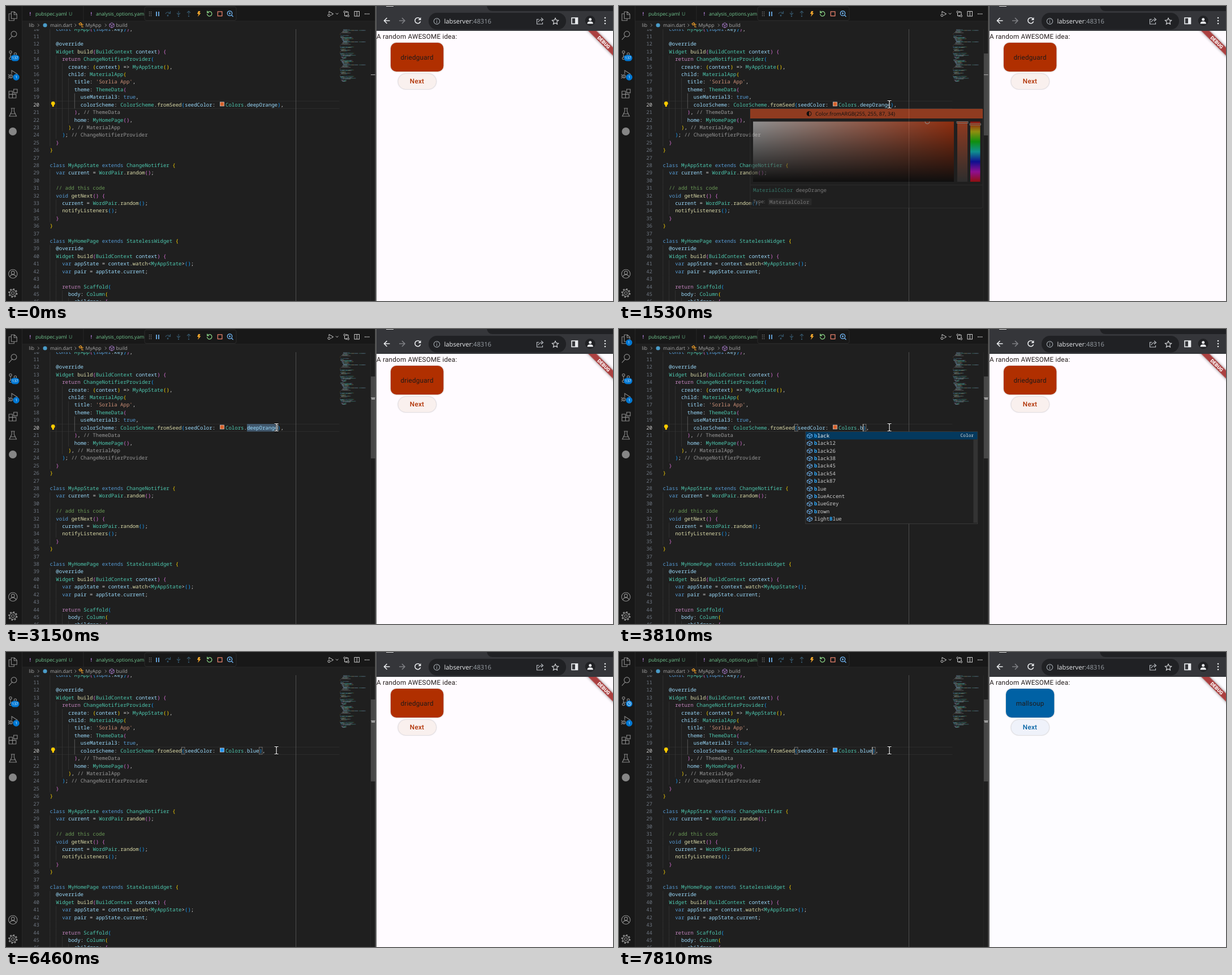
Write an HTML page that moves like this. It is 1073x522 px and loops after 8 s.

```html
<!DOCTYPE html>
<html lang="en">
<head>
<meta charset="utf-8">
<title>Changing a theme colour</title>
<style>
  html, body { margin: 0; width: 100%; height: 100%; overflow: hidden; background: #1f1f1f; }
  svg { display: block; width: 100vw; height: 100vh; text-rendering: geometricPrecision; white-space: pre; }
  .mono { font-family: "Noto Sans Mono", "DejaVu Sans Mono", monospace; font-size: 9.03px; }
  .ui { font-family: "Open Sans", "Noto Sans", sans-serif; font-size: 8.6px; }
  .page { font-family: Roboto, "Liberation Sans", sans-serif; font-size: 11.74px; letter-spacing: .21px; }
  .mid { text-anchor: middle; }
  .end { text-anchor: end; }
</style>
</head>
<body>
<svg id="stage" viewBox="0 0 1073 522" preserveAspectRatio="none"></svg>
<script>
const CODE = `  const MyApp({super.key});

  @override
  Widget build(BuildContext context) {
    return ChangeNotifierProvider(
      create: (context) => MyAppState(),
      child: MaterialApp(
        title: 'Sorlia App',
        theme: ThemeData(
          useMaterial3: true,
          colorScheme: ColorScheme.fromSeed(seedColor:   Colors.deepOrange),
        ), // ThemeData
        home: MyHomePage(),
      ), // MaterialApp
    ); // ChangeNotifierProvider
  }
}

class MyAppState extends ChangeNotifier {
  var current = WordPair.random();

  // add this code
  void getNext() {
    current = WordPair.random();
    notifyListeners();
  }
}

class MyHomePage extends StatelessWidget {
  @override
  Widget build(BuildContext context) {
    var appState = context.watch<MyAppState>();
    var pair = appState.current;

    return Scaffold(
      body: Column(
        children: [`.split('\n');

const FIRST = 10, LEFT = 77.5, CW = 5.42, LH = 13.41, VALUE_X = 388;
const top_ = n => 168 + (n - 20) * LH;
const base = n => top_(n) + 9.7;

// Markup helpers
const esc = s => s.replace(/&/g, '&amp;').replace(/</g, '&lt;');
const rect = (x, y, w, h, fill, more = '') =>
  `<rect x="${x}" y="${y}" width="${w}" height="${h}" fill="${fill}" ${more}/>`;
const box = (x, y, w, h, stroke, more = '') => rect(x, y, w, h, 'none', `stroke="${stroke}" ${more}`);
const circle = (x, y, r, fill, more = '') => `<circle cx="${x}" cy="${y}" r="${r}" fill="${fill}" ${more}/>`;
const line = (d, stroke, w = 1, more = '') => `<path d="${d}" fill="none" stroke="${stroke}" stroke-width="${w}" ${more}/>`;
const shape = (d, fill) => `<path d="${d}" fill="${fill}"/>`;
const text = (x, y, s, fill, cls = 'ui', more = '') =>
  `<text x="${x}" y="${y}" fill="${fill}" class="${cls}" ${more}>${s}</text>`;
const span = (s, fill, more = '') => `<tspan fill="${fill}" ${more}>${s}</tspan>`;
const group = (id, body, more = '') => `<g id="${id}" ${more}>${body}</g>`;

// Syntax colouring
const BRACKETS = ['#ffd700', '#da70d6', '#179fff'];
let depth = 1;
function tint(s, col, src) {
  const next = src[col + s.length];
  if (s.startsWith('//')) return src.trim() === s ? '#6a9955' : '#999';
  if (s[0] === "'") return '#ce9178';
  if ('([{'.includes(s)) return BRACKETS[depth++ % 3];
  if (')]}'.includes(s)) return BRACKETS[--depth % 3];
  if (s === 'return') return '#c586c0';
  if (/^(class|extends|var|void|const|super|true)$/.test(s)) return '#569cd6';
  if (/^[A-Z]/.test(s)) return '#4ec9b0';
  if (/^\w/.test(s) && (next === '(' || next === '<')) return '#dcdcaa';
  return /^[@\w]/.test(s) ? '#9cdcfe' : '#d4d4d4';
}
const tokens = CODE.map(src =>
  [...src.matchAll(/\/\/.*|'.*?'|@?\w+|[^\s\w]/g)].map(m => ({ s: m[0], col: m.index, fill: tint(m[0], m.index, src) })));

function codeLines() {
  return CODE.map((src, i) => {
    const n = FIRST + i;
    const nearest = CODE.slice(i).find(s => s) || '';
    const indent = nearest.search(/\S/);
    let out = '';
    for (let c = 0; c < indent; c += 2) {
      const active = c === 8 && (n === 19 || n === 20);
      out += rect(LEFT + c * CW, top_(n), .7, LH, active ? '#707070' : '#383838');
    }
    const shown = tokens[i].filter(k => n !== 20 || k.col < 55);
    const spans = shown.map(k => span(esc(k.s), k.fill, `x="${LEFT + k.col * CW}"`)).join('');
    return out + text(59, base(n), n, n === 20 ? '#ccc' : '#6e7681', 'mono end') + text(0, base(n), spans, '#ccc', 'mono');
  }).join('');
}

function minimap() {
  let out = '';
  for (let n = 1; n <= 82; n++) {
    const i = (n < FIRST ? n + 18 : n > 46 ? n - 36 : n) - FIRST;
    for (const k of tokens[i])
      out += rect(590 + k.col * .6, 41.6 + (n - 1) * 1.13, k.s.length * .6, .8, k.fill);
  }
  return `<g opacity=".5">${out}</g>`;
}

function activityBar() {
  const icon = (y, body) =>
    `<g transform="translate(3.8 ${y - 8.4}) scale(.7)" fill="none" stroke="#8a8a8a" stroke-width="1.6">${body}</g>`;
  const p = d => `<path d="${d}"/>`;
  const c = (x, y, r, more) => circle(x, y, r, 'none', more);
  const badge = (x, y) => circle(x, y, 5.7, '#0078d4');
  const one = (x, y) => badge(x, y) + text(x, y + 2.4, 1, '#fff', 'ui mid', 'style="font-size:6.5px"');
  return rect(0, 0, 28, 522, '#181818') + rect(28, 0, .8, 522, '#2b2b2b')
    + icon(18, p('M8 1h8l6 6v11H8zM15 1v7h7M8 6H2v17h13v-5'))
    + icon(52, c(14.5, 8.5, 7) + p('M10 14l-8 9'))
    + icon(87, c(6, 4, 3) + c(18, 9, 3) + c(6, 20, 3) + p('M6 7v10M18 12c0 5-12 1-12 5'))
    + icon(121, p('M9 11V2l14 9-10 7') + c(7, 17, 4) + p('M7 13v8M0 12l4 3M0 22l4-3M0 17h3'))
    + icon(155, p('M2 6h9v8h9v9H2zM2 14h9v9M14 1h9v9h-9z'))
    + icon(188, p('M7 2h10M9 2v8L3 22h18L15 10V2M6.500 16h11'))
    + circle(12, 222, 7, '#868686')
    + icon(474, c(12, 12, 11) + c(12, 9, 4) + p('M4 20c2-8 14-8 16 0'))
    + icon(508, c(12, 12, 3.5) + c(12, 12, 8) + c(12, 12, 10, 'stroke-width="3.500" stroke-dasharray="4 3.854"'))
    + group('count', rect(8.500, 86.500, 15, 11, '#0078d4', 'rx="5.500"') + text(16, 94.400, 137, '#fff', 'ui mid', 'style="font-size:6.500px"'))
    + group('clock', badge(18, 91.5) + circle(18, 91.5, 3.3, 'none', 'stroke="#fff" stroke-width=".8"') + line('M18 89.500v2.200h1.800', '#fff', .8))
    + one(18, 126) + group('dirty', one(17.7, 24));
}

function editorHeader() {
  const grey = '#ccc', dim = '#35566b', blue = '#75beff';
  const crumb = (x, s) => text(x, 37.3, s, '#a9a9a9');
  const arrow = x => line(`M${x - 1} 31.500l2.500 2.500-2.500 2.500`, '#a9a9a9', .8);
  return rect(28.8, 0, 624, 41, '#1f1f1f') + rect(28.8, 0, 624, 27, '#181818') + rect(28.8, 26.5, 624, .7, '#2b2b2b')
    + rect(136.5, 0, .8, 27, '#2b2b2b')
    + text(41.5, 17.3, '!', '#b180d7', 'ui', 'font-weight="700"') + text(149.5, 17.3, '!', '#b180d7', 'ui', 'font-weight="700"')
    + text(52, 17.2, 'pubspec.yaml', '#73c991') + text(111, 17.2, 'U', '#5da37a') + text(159, 17.2, 'analysis_options.yaml', '#73c991')
    + rect(245, 1.5, 162, 24, '#181818', 'rx="3" stroke="#303030" stroke-width=".8"')
    + line('M253.500 10v8M256.500 10v8', '#999', 1.2, 'stroke-dasharray="1.200 2.100"')
    + line('M266 10v8M270 10v8', blue, 1.6)
    + line('M282 14a4.500 4.500 0 0 1 8-1M290.500 9v4.300h-4M305 9v6M302 12.500l3 3 3-3M323 15.500v-6M320 12l3-3 3 3', dim, 1.1)
    + circle(286, 17, 1.4, dim) + circle(305, 18, 1.2, dim) + circle(323, 18, 1.2, dim)
    + shape('M340 9h3.500l-1.500 3.500h2.500l-5.500 6.500 1.500-5h-2.500z', '#f0a52d')
    + line('M356.500 11a4.200 4.200 0 1 1-1 3M355.700 8.500v3.300h3.300', '#89d185', 1.3)
    + box(374.3, 10, 7.6, 7.6, '#f48771', 'stroke-width="1.200"')
    + circle(395.5, 13, 4.2, 'none', `stroke="${blue}" stroke-width="1.200"`) + line('M398.500 16l3 3M393.700 13h3.600M395.500 11.200v3.600', blue, 1.2)
    + line('M571 13V9.500l7.500 4.500-4 2.500M583 12.500l2.200 2.200 2.200-2.200', grey) + circle(571, 16.5, 2, 'none', `stroke="${grey}"`)
    + circle(598.5, 10.5, 1.6, 'none', `stroke="${grey}"`) + circle(605, 17.5, 1.6, 'none', `stroke="${grey}"`)
    + line('M598.500 12v5.500h3.500M605 16v-5.500h-3.500M601 15.800l1.500 1.700-1.500 1.700M602.500 8.800l-1.500 1.700 1.500 1.700', grey)
    + box(616, 9.5, 8.5, 8.5, grey) + line('M620.300 9.500v8.500', grey)
    + circle(635, 14, .9, grey) + circle(638.2, 14, .9, grey) + circle(641.4, 14, .9, grey)
    + crumb(40.5, 'lib') + arrow(57) + circle(69, 34, 3.6, '#4a9cc9') + crumb(78, 'main.dart') + arrow(122.5)
    + line('M129 31.500l3-2 2 2-3 2.500zM132 33h5M134 33v4h3', '#ee9d28', 1.1) + crumb(140.5, 'MyApp') + arrow(176)
    + line('M183 32l4-2.300 4 2.300v4.300l-4 2.300-4-2.300zM183 32l4 2.300 4-2.300M187 34.300v4.300', '#b180d7', .9) + crumb(194.500, 'build');
}

function hoverCard() {
  const stops = [0, 1, 2, 3, 4, 5, 6].map(i => `<stop offset="${i / 6}" stop-color="hsl(${i * 60} 100% 50%)"/>`).join('');
  const fade = (id, a, b, dir) =>
    `<linearGradient id="${id}" ${dir}><stop stop-color="${a}"/><stop offset="1" stop-color="${b}"/></linearGradient>`;
  const down = 'x2="0" y2="1"';
  return `<defs>${fade('sat', '#fff', '#ff3d00', '')}${fade('val', '#0000', '#000', down)}${fade('alpha', '#ff5722', '#3c3c3c', down)}
    <linearGradient id="hue" ${down}>${stops}</linearGradient></defs>`
    + rect(231.8, 181.5, 411, 176, '#202020', 'stroke="#454545" stroke-width=".7" rx="2"')
    + rect(232, 182, 411, 17, '#ff5722')
    + circle(336, 190.5, 4, 'none', 'stroke="#000"') + shape('M336 186.500a4 4 0 0 0 0 8z', '#000')
    + text(417.5, 193.8, 'Color.fromARGB(255, 255, 87, 34)', '#000', 'ui mid', 'style="font-size:9.100px"')
    + rect(237, 204.5, 355, 106.5, 'url(#sat)') + rect(237, 204.5, 355, 106.5, 'url(#val)')
    + `<path d="M541 204.500a4 4 0 0 0 8 0" fill="none" stroke="#fff"/>`
    + rect(598, 204.5, 18, 106.5, 'url(#alpha)') + rect(621, 204.5, 17.5, 106.5, 'url(#hue)')
    + box(597, 204.5, 20, 2.8, '#ddd', 'stroke-width=".8"') + box(620, 208, 19.5, 2.8, '#ddd', 'stroke-width=".8"')
    + rect(232, 316.5, 411, .7, '#454545')
    + text(237, 329.3, span('MaterialColor ', '#4ec9b0') + 'deepOrange', '#d4d4d4', 'mono')
    + text(237, 349.3, 'Type:', '#ccc') + rect(263.5, 340.5, 77, 12, '#343434', 'rx="2"') + text(266, 349.5, 'MaterialColor', '#ccc', 'mono');
}

const COLORS = ['black', ...[12, 26, 38, 45, 54, 87].map(n => 'black' + n),
  'blue', 'blueAccent', 'blueGrey', 'brown', 'lightBlue', 'lightBlueAccent'];
function suggestions(query) {
  const hits = COLORS.filter(c => c.toLowerCase().includes(query)).slice(0, 12);
  const h = hits.length * LH;
  const rows = hits.map((c, i) => {
    const y = 182 + i * LH, at = c.toLowerCase().indexOf(query), to = at + query.length;
    return line(`M332.500 ${y + 5.500}l4.500-2.500 4.500 2v3.500l-4.500 2.500-4.500-2zM332.500 ${y + 5.500}l4.500 1.700 4.500-2M337 ${y + 7.200}v3.800`, '#75beff', .9)
      + text(345, y + 9.7, c.slice(0, at) + span(c.slice(at, to), '#2aaaff', 'font-weight="700"') + c.slice(to), i ? '#ccc' : '#fff', 'mono');
  }).join('');
  return rect(329.8, 181.8, 304, h + 2, '#202020', 'stroke="#454545" stroke-width=".7"')
    + rect(330, 182, 303.500, LH, '#04395e') + rect(626.5, 182 + LH, 7, h - LH, '#333') + rows
    + text(627, 191, hits[0] === 'blue' ? 'MaterialColor' : 'Color', '#ddd', 'mono end', 'style="font-size:7.800px"');
}

function pageTheme(id, x, w, main, button, word) {
  const shadow = 'style="filter:drop-shadow(0 .8px .8px #0005)"';
  return group(id, text(655, 57.700, 'A random AWESOME idea:', '#201a18', 'page')
    + rect(x, 65, w, 51, main, `rx="10" ${shadow}`) + text(726.6, 94.800, word, '#201a18', 'page mid')
    + rect(693.3, 120, 67, 27, button, `rx="13.500" ${shadow}`)
    + text(726.5, 137.300, 'Next', main, 'page mid', 'font-weight="500"')
    + `<g transform="translate(1077 44) rotate(45)">`
    + rect(-45, 23.5, 90, 10.2, '#ab4040', 'style="filter:drop-shadow(0 0 2.500px #0007)"')
    + text(0, 31.7, 'DEBUG', '#fff', 'page mid', 'style="font-size:8.600px;font-weight:900;letter-spacing:0"') + '</g>');
}

function browserBar() {
  const white = '#e8eaed', grey = '#9aa0a6';
  return rect(655, 0, 418, 44, '#35363a') + shape('M850 0h223v9H860q-8 0-10-9z', '#202124') + rect(672, 0, 13, 1, '#ddd')
    + rect(747, 12, 243, 29.5, '#202124', 'rx="14.700"')
    + line('M678.500 26h-10M673.500 21l-5 5 5 5M732 22.800a5 5 0 1 0 .7 4.500', white, 1.6) + shape('M733.500 20v5h-5z', white)
    + line('M695 26h10M700 21l5 5-5 5', '#7d7f83', 1.6)
    + circle(761.5, 27, 5.2, 'none', `stroke="${grey}" stroke-width="1.200"`) + line('M761.500 26.500v3.500M761.500 24v1.300', grey, 1.2)
    + text(774.5, 30.8, 'labserver' + span(':48316', grey), white, 'ui', 'style="font-size:11.200px"')
    + line('M942 23.500h-3.500v8.500h10v-3M941 28.500c1-3.500 3.500-4.500 7-4.500M946 21l3.500 3-3.500 3', '#bdc1c6', 1.2)
    + line('M971 21.300l1.700 3.600 3.900.5-2.900 2.700.8 3.900-3.500-1.900-3.500 1.900.8-3.900-2.900-2.700 3.900-.5z', '#d5d7da', 1.2)
    + box(1000, 21, 10.5, 10.5, white, 'stroke-width="1.600"') + rect(1006, 21, 4.5, 10.5, white)
    + circle(1032.7, 26, 9, '#202124') + circle(1032.7, 23.7, 2.5, white) + shape('M1027.500 31.500q0-4.200 5.200-4.200t5.200 4.200z', white)
    + circle(1059, 21, 1.3, white) + circle(1059, 26, 1.3, white) + circle(1059, 31, 1.3, white);
}

const stage = document.getElementById('stage');
stage.innerHTML = rect(0, 0, 1073, 522, '#1f1f1f')
  + rect(LEFT, 167.8, 512, .8, '#303030') + rect(LEFT, 180.9, 512, .8, '#303030') + rect(512, 41, .8, 481, '#5a5a5a')
  + group('selection', rect(VALUE_X + 7 * CW, 168, 10 * CW, LH, '#41586d'))
  + codeLines()
  + circle(83.2, 172.3, 3.4, '#ffcc00') + rect(81.7, 175, 3, 3.2, '#ffcc00')
  + `<rect id="swatch" x="378.500" y="170" width="7" height="7" stroke="#ddd" stroke-width=".7"/>`
  + text(VALUE_X, base(20), span('Colors', '#4ec9b0') + '.' + span('', '#9cdcfe', 'id="word"') + span(')', '#179fff') + ',', '#d4d4d4', 'mono')
  + group('pairs', box(LEFT + 43 * CW, 168.5, CW, 12.4, '#888', 'stroke-width=".7"')
    + box(0, 168.5, CW, 12.4, '#888', 'stroke-width=".7" id="closer"'))
  + rect(0, 168, 1.4, LH, '#aeafad', 'id="caret"')
  + minimap()
  + rect(644.3, 41, .7, 481, '#2b2b2b') + group('slider', rect(645, 84, 8, 145, '#797979', 'opacity=".45"'))
  + rect(645, 121, 8, 1.2, '#a0a0a0') + group('mark', rect(646, 122, 6, 3, '#999'))
  + editorHeader() + activityBar()
  + group('hover', hoverCard()) + group('list', '')
  + rect(652.5, 0, 2.5, 522, '#5c5c5c')
  + rect(655, 44, 418, 478, '#fffbff', 'id="paper"')
  + pageTheme('orange', 680, 93.3, '#b02f00', '#f9f0ee', 'driedguard')
  + pageTheme('blue', 684, 85.3, '#0061a4', '#eff2fa', 'mallsoup')
  + browserBar()
  + group('pointer', group('click', circle(-2, -1, 10, '#e0d800', 'opacity=".75"'))
    + group('beam', line('M-3.500-6.500h2.500l1 1 1-1h2.500M0-5.500v11M-3.500 6.500h2.500l1-1 1 1h2.500', '#000', 2.4) + line('M-3.500-6.500h2.500l1 1 1-1h2.500M0-5.500v11M-3.500 6.500h2.500l1-1 1 1h2.500', '#fff', 1.2))
    + group('arrow', '<path d="M0 0v15l3.500-3.300 2.300 5.300 2.200-1-2.300-5.200h5z" fill="#fff" stroke="#000" stroke-width=".8"/>'));

// Animation
const $ = id => document.getElementById(id);
const show = (id, on) => $(id).style.display = on ? '' : 'none';
const within = (t, a, b) => t >= a && t < b;
const step = (t, first, ...changes) => changes.reduce((v, [at, next]) => t >= at ? next : v, first);
const ease = (t, a, b) => { const k = Math.min(1, Math.max(0, (t - a) / (b - a))); return k * k * (3 - 2 * k); };

let lastQuery;
function draw(t) {
  const go = ease(t, 500, 740), settle = ease(t, 1060, 1470);
  const x = 945 - 460 * go - 7 * settle, y = 499 - 249 * go - 76 * settle;
  show('pointer', t >= 520);
  $('pointer').setAttribute('transform', `translate(${x} ${y})`);
  show('arrow', x > 655);
  show('beam', x <= 655);
  show('click', within(t, 1850, 2000) || within(t, 2070, 2150));

  show('slider', t >= 660);
  show('hover', within(t, 1530, 1850));
  $('hover').style.opacity = t < 1590 ? .5 : 1;
  show('selection', within(t, 2150, 3550));
  show('mark', t >= 2400);

  const word = step(t, 'deepOrange', [3550, 'b'], [4060, 'bl'], [4660, 'blu'], [4800, 'blue']);
  $('word').textContent = word;
  const end = VALUE_X + (7 + word.length) * CW;
  const typed = step(t, 1850, [2150, 2150], [3550, 3550], [4060, 4060], [4660, 4660], [4800, 4810]);
  $('caret').setAttribute('x', end - .5);
  show('caret', t >= 1850 && (t < typed || Math.floor((t - typed) / 500) % 2 === 0));
  $('closer').setAttribute('x', end);
  show('pairs', t >= 3550);
  $('swatch').setAttribute('fill', t < 5130 ? '#d9622b' : '#2196f3');

  const query = step(t, 'b', [4400, 'bl'], [4660, 'blu'], [4870, 'blue']);
  if (query !== lastQuery) $('list').innerHTML = suggestions(lastQuery = query);
  show('list', within(t, 3740, 5740));

  show('dirty', within(t, 3620, 6300));
  show('count', t < 7680);
  show('clock', t >= 7680);
  show('orange', t < 6690);
  show('blue', t >= 7090);
  $('paper').setAttribute('fill', t < 6690 ? '#fffbff' : '#fdfcff');
}

function frame() {
  draw(performance.now() % 8000);
  requestAnimationFrame(frame);
}
frame();
</script>
</body>
</html>
```
